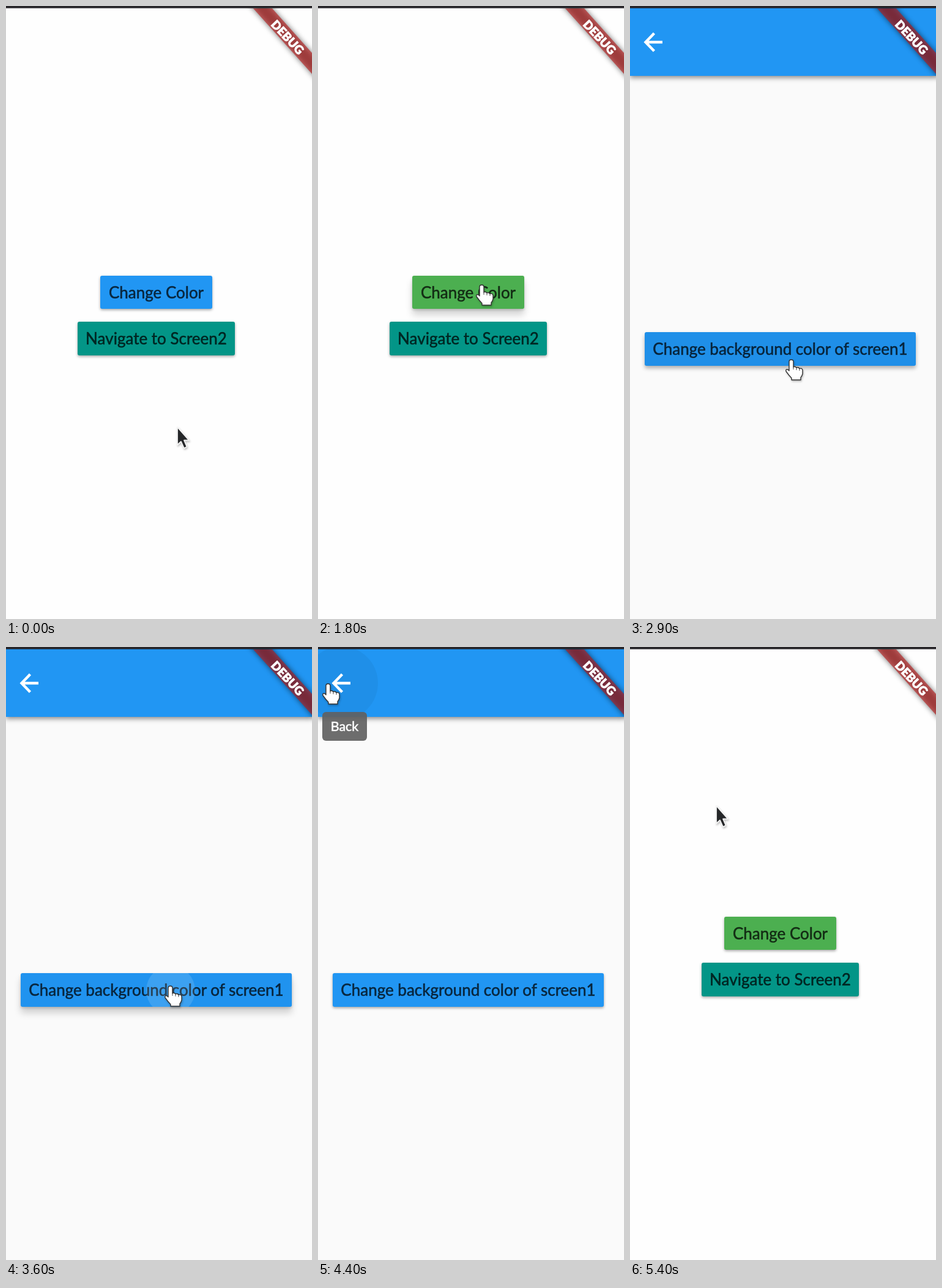
These frames come from a looping animation (500x1000 px, 5.9 s). An HTML page:

```html
<!DOCTYPE html>
<html lang="en">
<head>
<meta charset="utf-8">
<title>Two screens</title>
<style>
  :root {
    --blue: #2196f3;
    --rest: 0 2px 4px rgba(0, 0, 0, .34);
    --hover: 0 4px 6px rgba(0, 0, 0, .3);
    --press: 0 10px 12px rgba(0, 0, 0, .17), 0 2px 4px rgba(0, 0, 0, .18);
  }
  html, body { margin: 0; width: 100%; height: 100%; overflow: hidden; }
  body { position: relative; background: #fefefe; font-family: Lato, "Open Sans", sans-serif; }
  div, svg { position: absolute; }

  /* every moving part shares one clock */
  .anim { animation: 5900ms step-end infinite; }

  .button, #tip, #bar svg, #frame, #cursor { filter: blur(.55px); }

  .button {
    border-radius: 3px;
    box-shadow: var(--rest);
    color: rgba(0, 0, 0, .72);
    font-size: 26px;
    text-align: center;
    white-space: nowrap;
    -webkit-text-stroke: .6px rgba(0, 0, 0, .6);
  }
  .clip { inset: 0; overflow: hidden; border-radius: 3px; }
  .ripple { width: 2px; height: 2px; border-radius: 50%; background: rgba(255, 255, 255, .13); opacity: 0; }

  #change { left: 154px; top: 440px; width: 183px; height: 54px; line-height: 54px; background: var(--blue); animation-name: change; }
  #change .ripple { left: 115px; top: 29px; animation-name: ripple-change; }
  #navigate { left: 117px; top: 515px; width: 257px; height: 55px; line-height: 54px; background: #039587; animation-name: navigate; }

  #second { inset: 0; background: #fafafa; opacity: 0; overflow: hidden; animation-name: second; }
  #bar { left: 0; top: 0; width: 500px; height: 113.5px; background: var(--blue); box-shadow: 0 3px 8px rgba(0, 0, 0, .46); overflow: hidden; }
  #halo { left: -22px; top: -1px; width: 120px; height: 120px; border-radius: 50%; background: rgba(0, 0, 0, .045); opacity: 0; animation-name: back; }
  #recolor { left: 24px; top: 532px; width: 443px; height: 55px; line-height: 55px; background: var(--blue); animation-name: recolor; }
  #recolor .ripple { left: 244px; top: 27px; animation-name: ripple-recolor; }
  #tip {
    left: 7px; top: 106px; width: 73px; height: 47px; line-height: 47px;
    border-radius: 6px; background: rgba(97, 97, 97, .92);
    color: #fff; font-size: 21.5px; text-align: center; opacity: 0;
    -webkit-text-stroke: .6px #fff;
    animation-name: back;
  }

  #frame { left: 0; top: 0; }
  #cursor { left: 0; top: 0; width: 60px; height: 60px; overflow: visible; filter: blur(.5px) drop-shadow(1px 2px 1.5px rgba(0, 0, 0, .25)); animation-name: move; }
  #arrow { animation-name: arrow; }
  #hand { animation-name: hand; }

  @keyframes change {
    0% { background: var(--blue); box-shadow: var(--rest); }
    10.169% { background: #2092f0; box-shadow: var(--hover); }
    20.338% { background: #2092f0; box-shadow: var(--press); }
    27.118% { background: #4caf50; box-shadow: var(--press); }
    32.203%, 100% { background: #4caf50; box-shadow: var(--rest); }
  }
  @keyframes navigate {
    0% { background: #039587; box-shadow: var(--rest); }
    6.779% { background: #058f82; box-shadow: var(--hover); }
    11.864% { background: #039587; box-shadow: var(--rest); }
    33.898% { background: #058f82; box-shadow: var(--hover); }
    40.677% { background: #049184; box-shadow: var(--press); }
    44.067%, 100% { background: #039587; box-shadow: var(--rest); }
  }
  @keyframes recolor {
    0% { background: #1f8fe8; box-shadow: var(--hover); }
    61.016% { background: #2093ef; box-shadow: var(--press); }
    66.101% { background: var(--blue); box-shadow: var(--hover); }
    71.186%, 100% { background: var(--blue); box-shadow: var(--rest); }
  }
  @keyframes ripple-change {
    0% { opacity: 0; transform: scale(1); }
    20.338% { opacity: 1; transform: scale(32); }
    22.033% { opacity: 1; transform: scale(65); }
    27.118% { opacity: .8; transform: scale(90); }
    28.813% { opacity: .4; transform: scale(120); }
    30.508%, 100% { opacity: 0; transform: scale(120); }
  }
  @keyframes ripple-recolor {
    0% { opacity: 0; transform: scale(1); }
    61.016% { opacity: 1; transform: scale(40); }
    62.711% { opacity: .9; transform: scale(110); }
    64.406% { opacity: .5; transform: scale(200); }
    66.101%, 100% { opacity: 0; transform: scale(250); }
  }
  @keyframes second {
    0% { opacity: 0; }
    44.067% { opacity: 1; }
    81.355%, 100% { opacity: 0; }
  }
  @keyframes back {
    0% { opacity: 0; }
    72.881% { opacity: .6; }
    74.576% { opacity: 1; }
    81.355%, 100% { opacity: 0; }
  }
  @keyframes move {
    0% { transform: translate(280px, 686px); animation-timing-function: steps(6); }
    10.169% { transform: translate(267px, 476px); animation-timing-function: steps(2); }
    13.559%, 27.118% { transform: translate(268px, 456px); }
    27.118% { animation-timing-function: steps(5); }
    35.593%, 42.372% { transform: translate(260px, 542px); }
    42.372% { animation-timing-function: steps(2); }
    45.762%, 50.847% { transform: translate(264px, 578px); }
    50.847% { animation-timing-function: steps(3); }
    55.932%, 64.406% { transform: translate(269px, 554px); }
    64.406% { animation-timing-function: steps(2); }
    67.796% { transform: translate(150px, 405px); animation-timing-function: steps(3); }
    72.881%, 81.355% { transform: translate(17px, 61px); }
    81.355% { animation-timing-function: steps(5); }
    89.830%, 100% { transform: translate(141px, 258px); }
  }
  @keyframes arrow {
    0% { opacity: 1; }
    6.779% { opacity: 0; }
    40.677% { opacity: 1; }
    44.067% { opacity: 0; }
    66.101% { opacity: 1; }
    72.881% { opacity: 0; }
    81.355%, 100% { opacity: 1; }
  }
  @keyframes hand {
    0% { opacity: 0; }
    6.779% { opacity: 1; }
    40.677% { opacity: 0; }
    44.067% { opacity: 1; }
    66.101% { opacity: 0; }
    72.881% { opacity: 1; }
    81.355%, 100% { opacity: 0; }
  }
</style>
</head>
<body>
  <div id="change" class="button anim"><div class="clip"><div class="ripple anim"></div></div>Change Color</div>
  <div id="navigate" class="button anim">Navigate to Screen2</div>

  <div id="second" class="anim">
    <div id="bar">
      <div id="halo" class="anim"></div>
      <svg width="80" height="113" fill="none" stroke="#fff" stroke-width="4.4">
        <path d="M53 59H27M39.5 44.5L25.5 59L39.5 73.5"/>
      </svg>
    </div>
    <div id="recolor" class="button anim"><div class="clip"><div class="ripple anim"></div></div>Change background color of screen1</div>
    <div id="tip" class="anim">Back</div>
  </div>

  <!-- corner ribbon and top edge, drawn past the stage so the softness stays inside -->
  <svg id="frame" width="500" height="1000" overflow="visible">
    <defs>
      <filter id="soft" x="-30%" y="-30%" width="160%" height="160%"><feGaussianBlur stdDeviation="5"/></filter>
    </defs>
    <path d="M386 -16L417 -16L520 99L520 133Z" filter="url(#soft)" opacity=".55"/>
    <path d="M404 4L435 4L520 99L520 133Z" fill="#b71c1c" fill-opacity=".63"/>
    <text transform="translate(460 51) rotate(47)" y="7" text-anchor="middle" font-size="19.5" font-weight="900" fill="#fff" stroke="#fff" stroke-width=".7">DEBUG</text>
    <rect x="-10" y="-10" width="520" height="13.6" fill="#262428"/>
  </svg>

  <svg id="cursor" class="anim">
    <path id="arrow" class="anim" d="M0 1V30L6 24.5L11 35.5L15.5 33L11 22.5H19Z" fill="#252729" stroke="#f4f4f4" stroke-width="1.8" stroke-linejoin="round"/>
    <g id="hand" class="anim" stroke="#333" stroke-width="1.4" stroke-linejoin="round">
      <path fill="#fff" d="M-4 2.5Q-4 -1 -.5 -1Q3 -1 3 2.5V11Q5.5 9 8 12Q11 10.5 13 13.5Q17 12 18 16V22Q17 26 15 28V32H0V29Q-4 25 -9 18Q-10 14 -6 15L-4 17Z"/>
      <path fill="none" stroke-width=".9" d="M3 11V15M8 12V16M13 13.5V17"/>
    </g>
  </svg>
</body>
</html>
```
